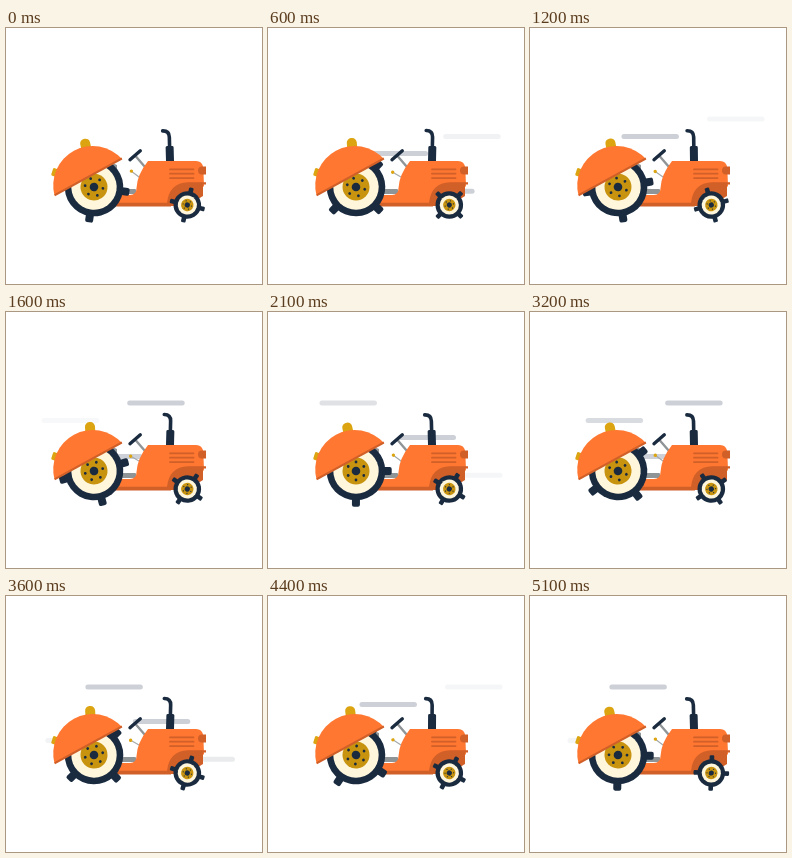
These frames come from a looping animation (256 by 256 pixels, 5.2 s). An HTML page:

```html
<!DOCTYPE html>
<html lang="en">
<head>
<meta charset="utf-8">
<title>Tractor</title>
<style>
  html, body { margin: 0; width: 100%; height: 100%; overflow: hidden; background: #fff; }
  svg { display: block; width: 100vw; height: 100vh; }
  .orange { fill: #ff7730; }
  .rust { fill: #d05f28; }
  .navy { fill: #1a2b40; }
  .gold { fill: #dba410; }
  .hub { fill: #c8930f; }
  .cream { fill: #fff6dc; }
  .grey { fill: #8f9497; }
  .line { fill: none; stroke-linecap: round; stroke-linejoin: round; }
</style>
</head>
<body>
<svg viewBox="0 0 256 256">
  <g id="wind" fill="#cdd1d7"></g>

  <g id="seat"><rect class="gold" x="81" y="110" width="10" height="30" rx="4.5"/></g>
  <rect class="gold" x="46" y="140.5" width="6" height="8" rx="1.5" transform="rotate(18 49 144.5)"/>

  <g id="pipe">
    <path class="line" stroke="#1a2b40" stroke-width="3.6" d="M157.5 102.7Q164 102.7 164 109V122"/>
    <rect class="navy" x="160" y="118" width="8" height="17" rx="1.5"/>
  </g>

  <path class="line" stroke="#8f9497" stroke-width="2.4" d="M129.5 128L139 139"/>
  <path class="line" stroke="#1a2b40" stroke-width="3.4" d="M124 131.7L134.3 122.8"/>
  <g id="lever">
    <path class="line" stroke="#a5a9ab" stroke-width="1.2" d="M125 143.7L133 149"/>
    <circle class="gold" cx="125" cy="143.7" r="1.7"/>
  </g>

  <path class="grey" d="M104 134L111 137V145H104Z"/>
  <rect class="grey" x="112" y="161" width="18" height="5" rx="1"/>
  <path class="orange" d="M142 133H190Q196.500 133 197.300 140L198 158Q190 166 180 178H107V167H124Q130.500 167 130.500 160Q131 147 142 133Z"/>
  <path class="rust" d="M107 174.800H165V178.500H107Z"/>
  <path class="rust" d="M161 175Q163 155 182 154.200H200V156.600H197V168L181 178H161Z"/>
  <path class="rust" d="M200 138.500V146.500H196A4 4 0 0 1 196 138.500Z"/>
  <path class="line" stroke="#d05f28" stroke-width="1.8" d="M164 141.300H187.500M164 145.700H187.500M164 150.100H187.500"/>

  <g id="rear"></g>
  <g id="front"></g>

  <path class="orange" d="M48.500 167.500A39.500 39.500 0 0 1 116 131Z"/>
  <path class="rust" d="M48.300 166.200L115.500 129.600L116.300 131.500L49 168.300Z"/>
</svg>
<script>
  const $ = id => document.getElementById(id);
  const LOOP = 5200, STEP = 100, FPS = 30, CYCLE = 154;

  const circle = (cls, r, x = 0, y = 0) =>
    `<circle class="${cls}" cx="${x}" cy="${y}" r="${r}"/>`;

  function wheel(id, tyre, rim, hub, axle, lug, bolts) {
    let s = '';
    for (let a = 0; a < 360; a += 90)
      s += `<rect class="navy" x="${tyre - 3}" y="${-lug.w / 2}" width="${lug.r - tyre + 3}"
        height="${lug.w}" rx="${lug.w * 0.25}" transform="rotate(${a})"/>`;
    s += circle('navy', tyre) + circle('cream', rim) + circle('hub', hub) + circle('navy', axle);
    for (let i = 0; i < 6; i++) {
      const a = i * Math.PI / 3;
      s += circle('navy', bolts.size, bolts.r * Math.cos(a), bolts.r * Math.sin(a));
    }
    $(id).innerHTML = s;
  }
  wheel('rear', 29.3, 22.7, 13.5, 4.3, { r: 35.7, w: 8 }, { r: 9, size: 1.4 });
  wheel('front', 13.8, 9.6, 6.2, 2.6, { r: 17.8, w: 4.6 }, { r: 4.3, size: 0.6 });

  // Each streak: height and the moments it sets off
  const streaks = [
    { y: 125.4, at: [2, 53, 97.2] },
    { y: 163.2, at: [12, 63, 106.8] },
    { y: 108.4, at: [17.6, 69.9, 113.6] },
    { y: 144.4, at: [27, 78.4, 123] },
    { y: 91, at: [36, 87, 132] }
  ];
  for (const s of streaks) {
    s.el = document.createElementNS('http://www.w3.org/2000/svg', 'rect');
    const box = { y: s.y - 2.5, width: 57.5, height: 5, rx: 2.5 };
    for (const k in box) s.el.setAttribute(k, box[k]);
    $('wind').append(s.el);
  }

  const clamp = v => Math.max(0, Math.min(1, v));
  const spin = (id, a, x, y) => $(id).setAttribute('transform', `rotate(${a} ${x} ${y})`);
  const roll = (id, a, x, y) => $(id).setAttribute('transform', `translate(${x} ${y}) rotate(${a})`);

  function draw(ms) {
    const f = ms * FPS / 1000, turn = f / CYCLE * 360;
    roll('rear', 8.3 + turn * 3, 88, 159);
    roll('front', 14 + turn * 5, 181.3, 177);

    const sway = -Math.cos(turn * 5 * Math.PI / 180);
    spin('seat', -8 + 4.6 * sway, 86, 146);
    spin('pipe', 1.6 * sway, 164, 133);
    spin('lever', -4 * sway, 133, 149);

    for (const s of streaks) {
      const age = s.at.map(a => f - a).find(a => a > -1 && a < 31.5);
      s.el.setAttribute('opacity', age === undefined ? 0 : Math.min(clamp((age + 1) / 5), clamp((31.5 - age) / 7)));
      if (age !== undefined) s.el.setAttribute('x', 177 - 4.65 * age);
    }
  }

  function tick(now) {
    draw(Math.floor((now + 16) % LOOP / STEP) * STEP);
    requestAnimationFrame(tick);
  }
  draw(0);
  requestAnimationFrame(tick);
</script>
</body>
</html>
```
